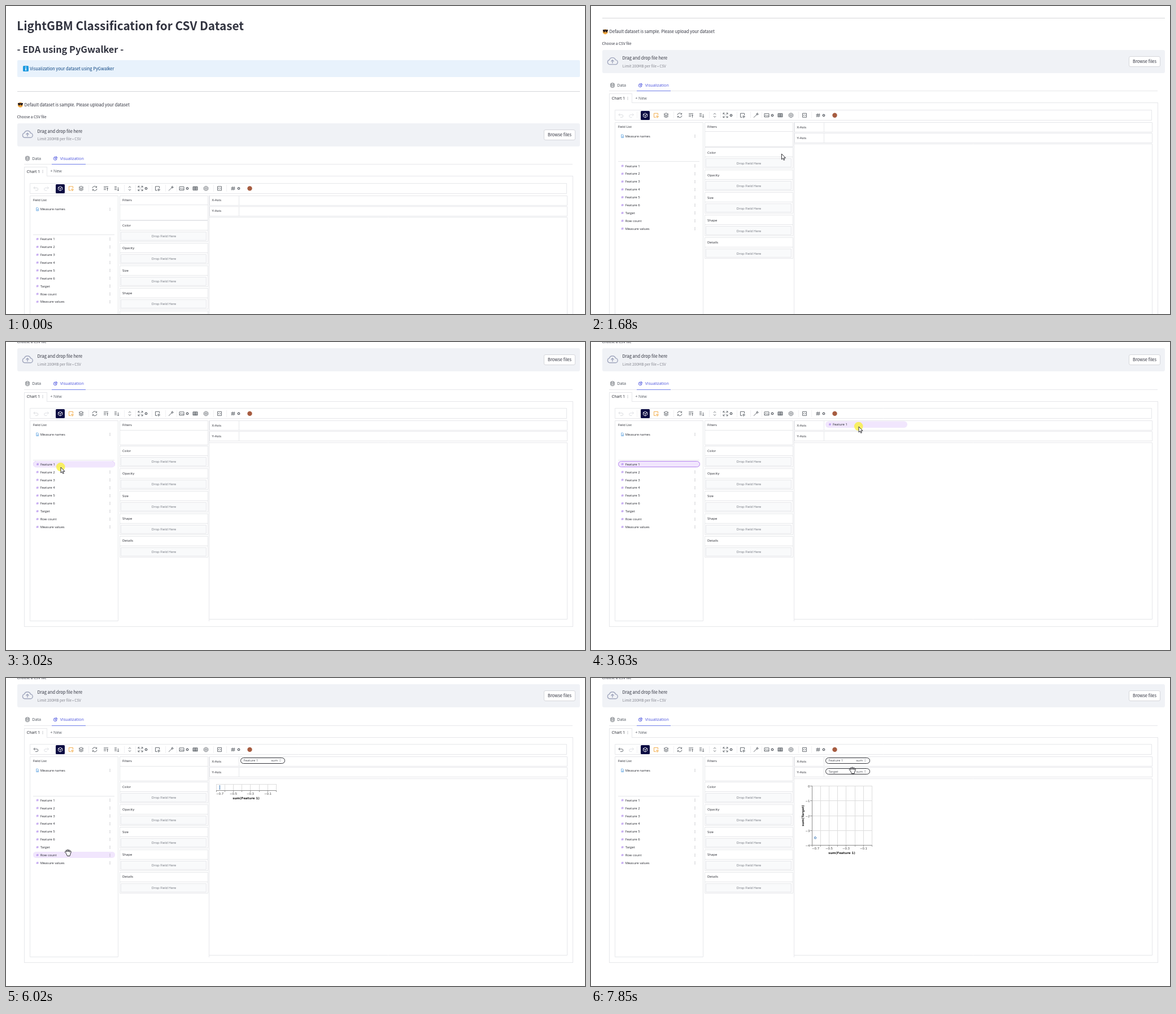
These frames come from a looping animation (1025x546 px, 8 s). An HTML page with a canvas:

```html
<!DOCTYPE html>
<html lang="en">
<head>
<meta charset="utf-8">
<title>CSV dataset explorer</title>
<style>
html, body { margin: 0; width: 100%; height: 100%; overflow: hidden; background: #fff; }
canvas { display: block; width: 1025px; height: 546px; }
</style>
</head>
<body>
<canvas id="stage" width="1025" height="546"></canvas>
<script>
const ctx = document.getElementById('stage').getContext('2d');
const LOOP = 8000, TICK = 67, SCROLL_END = 196.5;
const PAGE_FONT = '"Noto Sans CJK JP", "Noto Sans CJK KR", "Noto Sans CJK SC", "Noto Sans", sans-serif';
const APP_FONT = '"Open Sans", "Noto Sans", sans-serif';
const PLOT_FONT = '"DejaVu Sans", sans-serif';
const INK = '#31333f', APP_INK = '#24262e', LINE = '#e6e7ea', LILAC = '#f1e6fd', INDIGO = '#4a52de', BLUE = '#3f7ab8';
const FIELDS = ['Feature 1', 'Feature 2', 'Feature 3', 'Feature 4', 'Feature 5', 'Feature 6',
  'Target', 'Row count', 'Measure values'];
const CHANNELS = ['Color', 'Opacity', 'Size', 'Shape', 'Details'];

const ICONS = {
  undo: 'M-4-1H1.5A2.3 2.3 0 0 1 1.5 3.6H-1M-4-1L-1.7-3.3M-4-1L-1.7 1.3',
  redo: 'M4-1H-1.5A2.3 2.3 0 0 0-1.5 3.6H1M4-1L1.7-3.3M4-1L1.7 1.3',
  cube: 'M0-4L3.5-2V2L0 4L-3.5 2V-2ZM-3.5-2L0 0L3.5-2M0 0V4',
  pick: 'M3.5 0V-3.5H-3.5V3.5H0M1 1L4.6 2.2L3 3L2.2 4.6Z',
  layers: 'M0-4L4-2L0 0L-4-2ZM-4 0L0 2L4 0M-4 2L0 4L4 2',
  refresh: 'M-4-.5A4 4 0 0 1 3.4-2M4 .5A4 4 0 0 1-3.4 2M3.6-4V-1.8H1.4M-3.6 4V1.8H-1.4',
  sortUp: 'M-4-3H4M-4-.5H0M-4 2H0M2.5 4V-1M1 .5L2.5-1L4 .5',
  sortDown: 'M-4-3H0M-4-.5H0M-4 2H0M2.5-2V4M1 2.5L2.5 4L4 2.5',
  upDown: 'M-2-1.5L0-3.5L2-1.5M-2 1.5L0 3.5L2 1.5',
  expand: 'M-4-1.5V-4H-1.5M4-1.5V-4H1.5M-4 1.5V4H-1.5M4 1.5V4H1.5M-4-4L-1-1M4-4L1-1M-4 4L-1 1M4 4L1 1',
  wrench: 'M-4 4L1-1M1-1A2.3 2.3 0 0 1 3-4L2-2.5L3-1.5L4.3-2.5A2.3 2.3 0 0 1 1-1',
  image: 'M-4-3H4V3H-4ZM-4 2L-1.5-.5L.5 1.5L2 0L4 2',
  table: 'M-4-3H4V3H-4ZM-4-2H4M-4 0H4M-4 1.5H4M0-3V3',
  gear: 'M0-4L3.5-2V2L0 4L-3.5 2V-2ZM1.5 0A1.5 1.5 0 1 1-1.5 0A1.5 1.5 0 1 1 1.5 0',
  knob: 'M1.7 0A1.7 1.7 0 1 1-1.7 0A1.7 1.7 0 1 1 1.7 0',
  code: 'M-3.5-3.5H3.5V3.5H-3.5ZM-.8-1.3L-2 0L-.8 1.3M.8-1.3L2 0L.8 1.3',
  hash: 'M-1-3.5L-2 3.5M2-3.5L1 3.5M-3.5-1.2H3.5M-3.5 1.2H3.5',
  smallHash: 'M-.4-2L-1.1 2M1.1-2L.4 2M-2-.7H2M-2 .7H2',
  data: 'M-3-2.5A3 1.3 0 0 1 3-2.5A3 1.3 0 0 1-3-2.5V2.5A3 1.3 0 0 0 3 2.5V-2.5M-3 0A3 1.3 0 0 0 3 0',
  pie: 'M-.5-2.8A3 3 0 1 0 2.8 1L-.5 .8ZM1-3.5A3 3 0 0 1 3.5-.8H1Z',
  cloud: 'M-5 6H5A4 4 0 0 0 5.5-2A5.8 5.8 0 0 0-5.5-2.2A4.2 4.2 0 0 0-5 6M0 4V-1.5M-2.5 .5L0-2L2.5 .5',
  doc: 'M-2-2.7H.8L2-1.5V2.7H-2ZM-1 .3H1M-1 1.5H1',
  sorter: 'M-1-.7L0-1.7L1-.7M-1 .7L0 1.7L1 .7',
  arrow: 'M0 0V10L2.3 7.9L3.8 11.4L5.4 10.7L3.9 7.3H7Z',
  hand: 'M-3.5 1L-5.5-1A1 1 0 0 1-4-2.3L-3-1.5L-4-4A.9 .9 0 0 1-2.4-4.6L-1.2-2L-1.3-5A.9 .9 0 0 1 .5-5' +
    'L.8-2L1.8-4.6A.9 .9 0 0 1 3.4-4.1L2.7-1.4L4-2.8A.9 .9 0 0 1 5.4-1.9L4 2L3 5.5H-1.5Z'
};
for (const name in ICONS) ICONS[name] = new Path2D(ICONS[name]);

// Toolbar: icon name, x, optional colour.
const TOOLS = [['pick', 115, '#f0a030'], ['layers', 133], ['refresh', 157], ['sortUp', 177], ['sortDown', 196],
  ['upDown', 219], ['expand', 238], ['knob', 248], ['pick', 268], ['wrench', 292], ['image', 311],
  ['knob', 321], ['table', 335], ['gear', 354], ['code', 378], ['hash', 402], ['knob', 412]];

// Pointer path: time, x, y.
const POINTER = [[402, 912, 480], [670, 337, 262], [1940, 337.5, 262], [2077, 177, 267], [2144, 168, 267],
  [2479, 97, 222], [3015, 97, 222], [3610, 474, 150], [3953, 474, 150], [4556, 112, 231], [5690, 112, 231],
  [6030, 110, 310], [6290, 110, 305], [6690, 110, 305], [7300, 460, 164], [7437, 460, 164], [7839, 463, 164]];

let scroll = 0;

const clamp = u => Math.min(1, Math.max(0, u));
const ease = u => (1 - Math.cos(Math.PI * clamp(u))) / 2;
const mix = (a, b, u) => a + (b - a) * u;
const within = (t, from, to) => t >= from && t < to;

function text(str, x, y, size, color = APP_INK, opt = {}) {
  ctx.font = `${opt.weight || 400} ${size}px ${opt.font || APP_FONT}`;
  ctx.textAlign = opt.align || 'left';
  ctx.fillStyle = color;
  ctx.fillText(str, x, y - scroll + size * 0.36);
}

function pageText(str, x, y, size, color = INK, weight = 400) {
  text(str, x, y, size, color, { font: PAGE_FONT, weight });
}

function box(x, y, w, h, fill, stroke, r = 0) {
  const top = Math.round(y - scroll), inset = stroke ? 0.5 : 0;
  ctx.beginPath();
  ctx.roundRect(x + inset, top + inset, w - 2 * inset, h - 2 * inset, r);
  if (fill) { ctx.fillStyle = fill; ctx.fill(); }
  if (stroke) { ctx.lineWidth = 1; ctx.strokeStyle = stroke; ctx.stroke(); }
}

const hline = (x1, x2, y, color = LINE) => box(x1, y, x2 - x1, 1, color);
const vline = (x, y, h, color = LINE) => box(x, y, 1, h, color);

function icon(name, x, y, color = '#50555d', width = 0.85, fill) {
  ctx.save();
  ctx.translate(x, y - scroll);
  if (fill) { ctx.fillStyle = fill; ctx.fill(ICONS[name]); }
  ctx.strokeStyle = color;
  ctx.lineWidth = width;
  ctx.lineJoin = 'round';
  ctx.stroke(ICONS[name]);
  ctx.restore();
}

function disc(x, y, r, color) {
  ctx.beginPath();
  ctx.arc(x, y - scroll, r, 0, 7);
  ctx.fillStyle = color;
  ctx.fill();
}

function dots(x, y, color = '#777b85') {
  for (const dy of [-2, 0, 2]) disc(x, y + dy, 0.5, color);
}

function drawHeader() {
  pageText('LightGBM Classification for CSV Dataset', 19.3, 35.3, 20.75, INK, 700);
  pageText('- EDA using PyGwalker -', 19.5, 77, 16.3, INK, 600);
  box(20, 96, 996, 30, '#e8f2fc', null, 2);
  box(30, 106, 10, 10, '#1e9be0', null, 1.5);
  ctx.fillStyle = '#fff';
  ctx.fillRect(34.3, 110 - scroll, 1.6, 4.5);
  disc(35.1, 108.2, 0.9, '#fff');
  pageText('Visualization your dataset using PyGwalker', 42.3, 111, 7.5, '#0b4480');
  hline(20, 1016, 150.5, '#d5d6d9');
  disc(25.3, 175.3, 4.5, '#f0a63c');
  box(21, 172, 9, 2, '#2a2024');
  disc(23.3, 174.6, 1.8, '#2a2024');
  disc(27.4, 174.6, 1.8, '#2a2024');
  pageText('Default dataset is sample. Please upload your dataset', 32.6, 175.3, 7.53);
  pageText('Choose a CSV file', 19.6, 196.3, 6.56);
  box(20, 207.5, 996, 41, '#f0f2f6', null, 3);
  icon('cloud', 38, 227.3, '#a0a6bd', 1.4);
  pageText('Drag and drop file here', 55.6, 222.2, 7.5);
  pageText('Limit 200MB per file • CSV', 55.8, 235.8, 6.56, '#85868f');
  box(952, 218.5, 56, 19, '#fff', '#d6d7dc', 2.5);
  pageText('Browse files', 959, 228, 7.5);
}

function drawTabs() {
  hline(32, 1003, 280);
  icon('data', 38, 270.2);
  text('Data', 46.3, 270.2, 7.2, '#4a505a');
  icon('pie', 87.3, 270.2, INDIGO);
  text('Visualization', 95.8, 270.2, 7.2, INDIGO);
  hline(81, 141, 280, '#6f7ee8');
  hline(32, 73, 285);
  vline(72, 285, 16);
  vline(32, 285, 416);
  hline(72, 1003, 301);
  vline(1003, 301, 400);
  hline(32, 1004, 700);
  text('Chart 1', 36.8, 293.2, 6.9);
  dots(65, 293.3);
  text('+ New', 78.2, 292.8, 7.1, '#5b6068');
}

function drawToolbar(canUndo) {
  box(42, 313.5, 951, 19, '#fff', LINE);
  for (const x of [81, 146, 209, 229, 258, 282, 302, 367, 390]) vline(x, 317, 12, '#f1f1f3');
  icon('undo', 53, 323.4, canUndo ? '#50555d' : '#d3d5d9');
  icon('redo', 71.5, 323.4, '#d9dbdf');
  box(88, 315.5, 16, 16, '#0a0a42', null, 1.5);
  icon('cube', 96, 323.5, '#fff');
  for (const [name, x, color] of TOOLS) icon(name, x, 323.4, color, name === 'knob' ? 1.2 : 0.85);
  disc(431.5, 323.4, 4.2, '#a65c40');
}

const rowY = i => 413.1 + i * 13.9;

function drawFields(hovered, dragged) {
  box(42, 335.5, 157, 356, null, LINE);
  text('Field List', 47.7, 343.6, 6);
  icon('doc', 55.7, 360.3, '#4f9be0', 0.7);
  text('Measure names', 60.8, 360.3, 5.9);
  dots(184, 360.3);
  hline(48, 192, 405);
  FIELDS.forEach((name, i) => {
    const y = rowY(i);
    if (i === dragged) box(48, y - 5.5, 145, 11, LILAC, '#b583ee', 5);
    else if (i === hovered) box(48, y - 5.5, 145, 11, LILAC, null, 5);
    icon('smallHash', 55.6, y, '#a57bea', 0.55);
    text(name, 60.7, y, 5.9);
    if (i !== dragged) dots(184, y);
  });
}

function drawShelves() {
  box(201, 335.5, 157, 44, null, LINE);
  hline(201, 357, 352);
  text('Filters', 206, 343.6, 6);
  CHANNELS.forEach((name, i) => {
    const y = 380 + i * 40;
    box(201, y, 157, 38, null, LINE);
    hline(201, 357, y + 17);
    text(name, 206, y + 9 - (i === 4 ? 0.6 : 0), 6);
    box(203, y + 20, 152, 16, '#f9fafb', LINE);
    text('Drop Field Here', 279.5, y + 28.2, 5.95, '#6c7079', { align: 'center' });
  });
  ['X-Axis', 'Y-Axis'].forEach((name, i) => {
    const y = 335.5 + i * 19;
    box(360, y, 634, 18, null, LINE);
    vline(412, y, 18);
    text(name, 364.4, y + 8.8, 6);
  });
  box(359, 374, 635, 314, null, LINE);
  vline(359, 335, 356);
}

function drawPill(name, y) {
  box(415, y - 5, 79, 11, '#fff', '#33343a', 5);
  text(name, 420.5, y + 0.4, 5.9, '#484b53');
  text('sum', 469.3, y + 0.4, 5.9, '#484b53');
  icon('sorter', 485.2, y + 0.4, '#484b53', 0.6);
}

function drawXAxis(left, top, bottom) {
  const plot = { font: PLOT_FONT };
  for (let i = 0; i <= 7; i++) {
    const x = Math.round(left + i * 15.1);
    vline(x, top, bottom - top, '#dddddd');
    vline(x, bottom, 3, '#999');
    if (i % 2 === 0) {
      text(`−0.${7 - i}`, i ? x + 0.5 : left, bottom + 6.2, 5.4, '#444', { ...plot, align: i ? 'center' : 'left' });
    }
  }
  hline(left, left + 106, bottom, '#8d8d8d');
  text('sum(Feature 1)', left + 53, bottom + 13.8, 5.5, '#222', { ...plot, weight: 700, align: 'center' });
}

function drawStrip() {
  hline(372, 478, 188, '#dddddd');
  drawXAxis(372, 188, 199);
  vline(378, 190, 8, BLUE);
}

function drawScatter() {
  const plot = { font: PLOT_FONT };
  for (let i = 0; i <= 4; i++) {
    const y = Math.round(191 + i * 26.25);
    hline(391, 497, y, '#dddddd');
    hline(388, 391, y, '#999');
    text(i ? `−${i}` : '0', 387.5, y + 0.7, 5.4, '#444', { ...plot, align: 'right' });
  }
  drawXAxis(391, 191, 296);
  vline(391, 191, 106, '#8d8d8d');
  ctx.save();
  ctx.translate(375, 244);
  ctx.rotate(-Math.PI / 2);
  text('sum(Target)', 0, 0, 5.5, '#222', { ...plot, weight: 700, align: 'center' });
  ctx.restore();
  icon('knob', 397, 283.3, BLUE, 1);
}

function drawDragPill(name, x, y) {
  ctx.beginPath();
  ctx.roundRect(x, y, 145, 11.5, 5.7);
  ctx.fillStyle = LILAC;
  ctx.fill();
  icon('smallHash', x + 8, y + 5.7, '#a57bea', 0.55);
  text(name, x + 13, y + 5.7, 5.9);
}

function pointerAt(t) {
  const next = POINTER.findIndex(key => key[0] > t);
  if (next < 0) return POINTER[POINTER.length - 1].slice(1);
  const [t0, x0, y0] = POINTER[next - 1], [t1, x1, y1] = POINTER[next];
  const u = ease((t - t0) / (t1 - t0));
  return [mix(x0, x1, u), mix(y0, y1, u)];
}

function draw(ms) {
  const t = Math.floor((ms + 12) / TICK) * TICK;
  const shown = t >= 402;
  const [px, py] = shown ? pointerAt(t) : [0, 0];
  const firstDrag = within(t, 3000, 3950), secondDrag = within(t, 6690, 7500);
  const dragged = firstDrag ? 0 : secondDrag ? 6 : -1;
  const xDropped = t >= 3950, yDropped = t >= 7500;
  const overList = t > 2000 && px < 193;
  const overPill = xDropped && px > 415 && px < 493 && py < 172;
  const hovered = overList && t > 2200 && dragged < 0 ? Math.floor((py - 212.5) / 13.9) : -1;

  scroll = SCROLL_END * ease((t - 1331) / 570);
  ctx.fillStyle = '#fff';
  ctx.fillRect(0, 0, 1025, 546);
  drawHeader();
  drawTabs();
  drawToolbar(xDropped);
  drawFields(hovered, dragged);
  drawShelves();

  scroll = 0;
  if (xDropped) drawPill('Feature 1', 145.6);
  if (yDropped) drawPill('Target', 165.3);
  if (t >= 7630) drawScatter();
  else if (t >= 4080) drawStrip();

  if (firstDrag) {
    const u = ease((t - 3015) / 595);
    drawDragPill('Feature 1', mix(48, 415, u), mix(211, 140.4, u));
  }
  if (secondDrag) {
    const u = ease((t - 6690) / 610);
    drawDragPill('Target', t >= 7437 ? 415 : mix(48, 395, u), mix(294.3, 159.8, u));
  }
  if (!shown) return;
  if (within(t, 2740, 3750) || within(t, 6490, 7430)) disc(px - 0.3, py - 0.5, 7.8, 'rgba(250,240,50,.75)');
  const hand = dragged < 0 && (overList || overPill);
  icon(hand ? 'hand' : 'arrow', px, py, '#26262c', 0.95, '#fff');
}

function frame(now) {
  draw(now % LOOP);
  requestAnimationFrame(frame);
}
requestAnimationFrame(frame);
</script>
</body>
</html>
```
